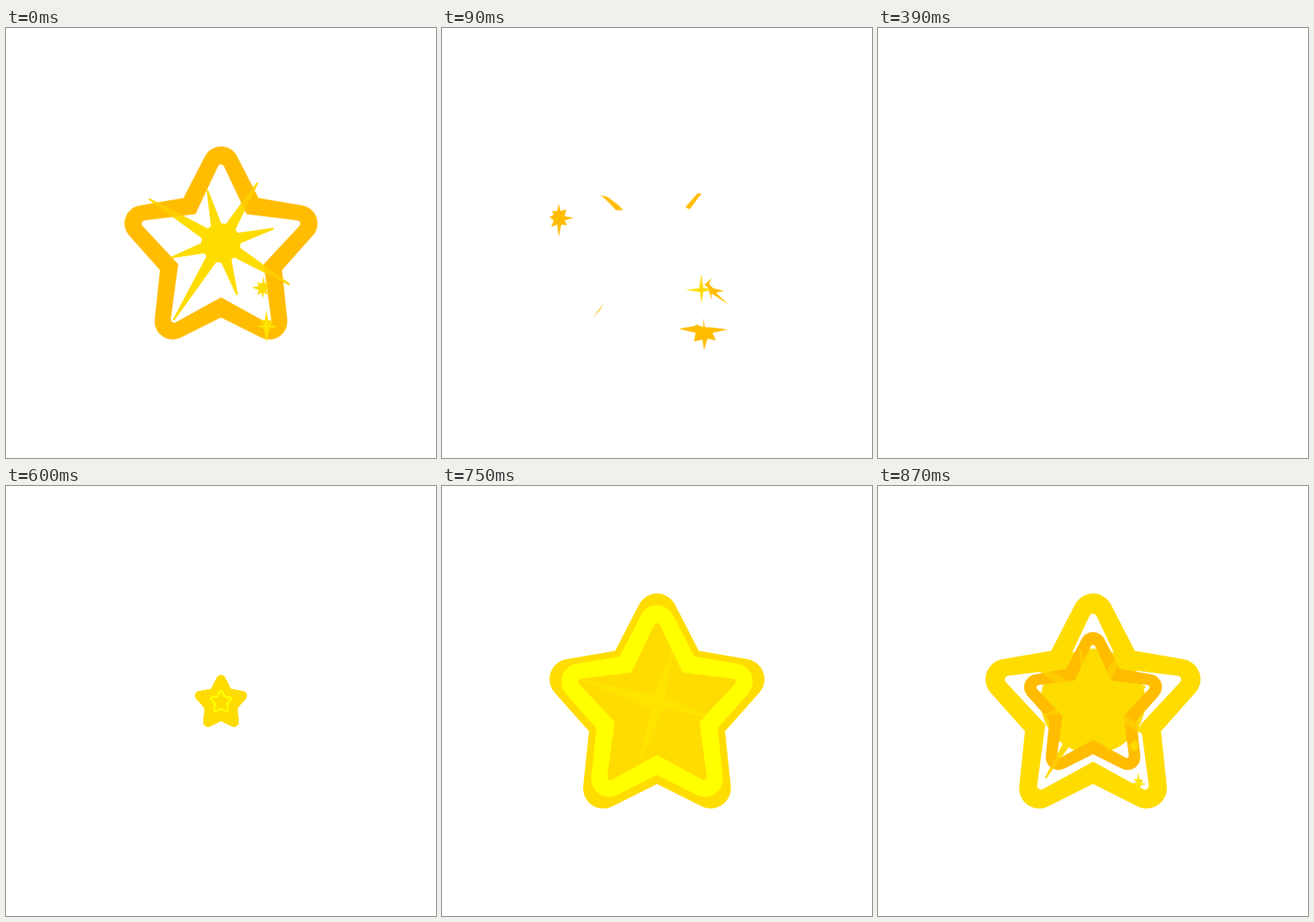
Write an HTML page without scripts that moves like this. It is 512 px wide and 512 px high and loops after 0.9 s.

```html
<!DOCTYPE html>
<html lang="en">
<head>
<meta charset="utf-8">
<title>Star burst</title>
<style>
html, body { margin: 0; width: 100%; height: 100%; overflow: hidden; background: #fff; }
svg { display: block; width: 100vw; height: 100vh; --amber: #ffdc00; --orange: #ffbc00; }
.amber { fill: var(--amber); stroke: var(--amber); }
.orange { fill: var(--orange); stroke: var(--orange); }
.part { transform-origin: 256px 256px; animation: 900ms step-end infinite; }
.body { animation-name: body; }
.ring { animation-name: grow, cool; }
.glint { animation-name: glint; }
.disc { animation-name: disc; }
.rays { animation-name: rays; }
.outline { animation-name: outline; }
.shards { animation-name: shards; }
.seed { animation-name: seed; }
.spark { animation-name: spark; }

@keyframes body {
  0%, 96.66%, 100% { transform: scale(0); }
  66.66% { transform: scale(.242); }
  73.33% { transform: scale(.51); }
  76.66% { transform: scale(.715); }
  80% { transform: scale(.88); }
  83.33% { transform: scale(1); }
}
@keyframes grow {
  0%, 100% { transform: scale(0); }
  66.66% { transform: scale(.105); }
  73.33% { transform: scale(.3); }
  76.66% { transform: scale(.5); }
  80% { transform: scale(.71); }
  83.33% { transform: scale(.891); }
  86.66% { transform: scale(.97); }
  90% { transform: scale(1); }
}
@keyframes cool {
  0% { fill: #ff0; stroke: #ff0; }
  90% { fill: #fff400; stroke: #fff400; }
  93.33% { fill: #ffe800; stroke: #ffe800; }
  96.66%, 100% { fill: var(--amber); stroke: var(--amber); }
}
@keyframes glint {
  0%, 90%, 100% { transform: scale(0); }
  73.33% { transform: rotate(-9deg) scale(.6); }
  76.66% { transform: rotate(-7deg) scale(.95); }
  80% { transform: rotate(-3deg); }
  83.33% { transform: none; }
  86.66% { transform: rotate(3deg); }
}
@keyframes disc {
  0% { transform: scale(1); }
  3.33% { transform: scale(.4); }
  6.66%, 100% { transform: scale(0); }
  96.66% { transform: scale(2.65); }
}
@keyframes rays {
  0% { transform: scale(1); }
  3.33% { transform: scale(1.05); }
  6.66%, 100% { transform: scale(0); }
  96.66% { transform: scale(1); }
}
@keyframes outline {
  0% { transform: scale(.898); }
  3.33% { transform: scale(1); }
  10%, 100% { transform: scale(0); }
  90% { transform: scale(.12); }
  93.33% { transform: scale(.37); }
  96.66% { transform: scale(.641); }
}
@keyframes shards {
  0%, 16.66%, 100% { transform: scale(0); }
  6.66% { transform: scale(.95); }
  10% { transform: scale(1); }
  13.33% { transform: scale(1.04); }
}
@keyframes seed {
  0%, 100% { transform: scale(1); }
  6.66% { transform: scale(0); }
  96.66% { transform: scale(.7); }
}
@keyframes spark {
  0%, 43.33%, 100% { transform: scale(0); }
  3.33% { transform: scale(.5); }
  6.66% { transform: scale(.8); }
  10% { transform: scale(1); }
  13.33% { transform: scale(1.15); }
  16.66% { transform: scale(1.1); animation-timing-function: steps(8); }
}
</style>
</head>
<body>
<svg viewBox="0 0 512 512">
  <defs>
    <g id="solid" stroke-width="48" stroke-linejoin="round">
      <path d="M256 152 290 218 360 230 312 284 320 360 256 328 192 360 200 284 152 230 222 218Z"/>
    </g>
    <mask id="hole" maskUnits="userSpaceOnUse" x="0" y="0" width="512" height="512">
      <path fill="#fff" d="M0 0H512V512H0Z"/>
      <path stroke="#000" stroke-width="9" stroke-linejoin="round"
        d="M256 156.500 287 222 356.500 230.500 308 282.500 318 357 256 323 194 357 204 282.500 155.500 230.500 225 222Z"/>
    </mask>
    <g id="frame" mask="url(#hole)"><use href="#solid"/></g>
    <path id="rays" stroke-width="2" stroke-linejoin="round"
      d="M240 194 258 240 299 185 269 246 318 239 272 258 337 305 266 269 275 317 254 272 200 347 243 266 198 273 240 254 171 204 246 243Z"/>
  </defs>

  <use class="part body amber" href="#solid"/>
  <path class="part glint" fill="#ffe400" d="M277 188 265 252 345 283 264 264 233 333 249 265 165 231 252 248Z"/>
  <use class="part ring" href="#frame"/>

  <circle class="part disc amber" cx="256" cy="256" r="23"/>
  <use class="part rays amber" href="#rays"/>
  <use class="part outline orange" href="#frame"/>
  <use class="part rays amber" href="#rays" opacity=".5"/>

  <g class="part shards" fill="var(--orange)">
    <path d="M189 199 197 201 209 210 216 217 207 217 200 209Z"/>
    <path d="M304 197 309 197 297 213 294 216 290 213Z"/>
    <path d="M192 328 188 336 180 344 187 335Z"/>
  </g>

  <path class="part seed" style="transform-origin:305px 309px" fill="var(--amber)"
    d="M307 295 308 304 313 303 310 308 314 310 310 312 312 318 307 315 306 322 304 315 299 318 301 312 293 309 301 307 299 303 305 304Z"/>
  <g class="part seed" style="transform-origin:310px 352px">
    <path fill="var(--amber)" d="M310 336 312 348 318 349 315 354 323 356 314 358 310 374 307 358 299 355 307 353 302 347 308 348Z"/>
    <path fill="#fff000" d="M299 355 310 354 323 355 310 356ZM310 340 311 355 310 374 309 355Z"/>
  </g>

  <path class="part spark" style="transform-origin:139px 226px" fill="var(--orange)"
    d="M139 209 141 218 148 216 146 224 157 226 146 229 149 235 142 234 139 249 137 234 130 237 133 229 128 225 133 222 131 218 137 218Z"/>
  <g class="part spark" style="transform-origin:312px 312px">
    <path fill="var(--orange)" d="M321 298 318 305 323 310 336 313 326 315 341 329 321 316 321 324 316 308 312 306Z"/>
    <path fill="var(--amber)" d="M290 312 306 310 309 293 311 309 322 312 311 314 309 328 307 314Z"/>
  </g>
  <path class="part spark" style="transform-origin:312px 360px" fill="var(--orange)"
    d="M282 358 300 355 303 353 311 356 311 345 313 356 324 357 340 359 322 363 326 372 316 370 312 384 310 371 300 373 302 363Z"/>
</svg>
</body>
</html>
```
